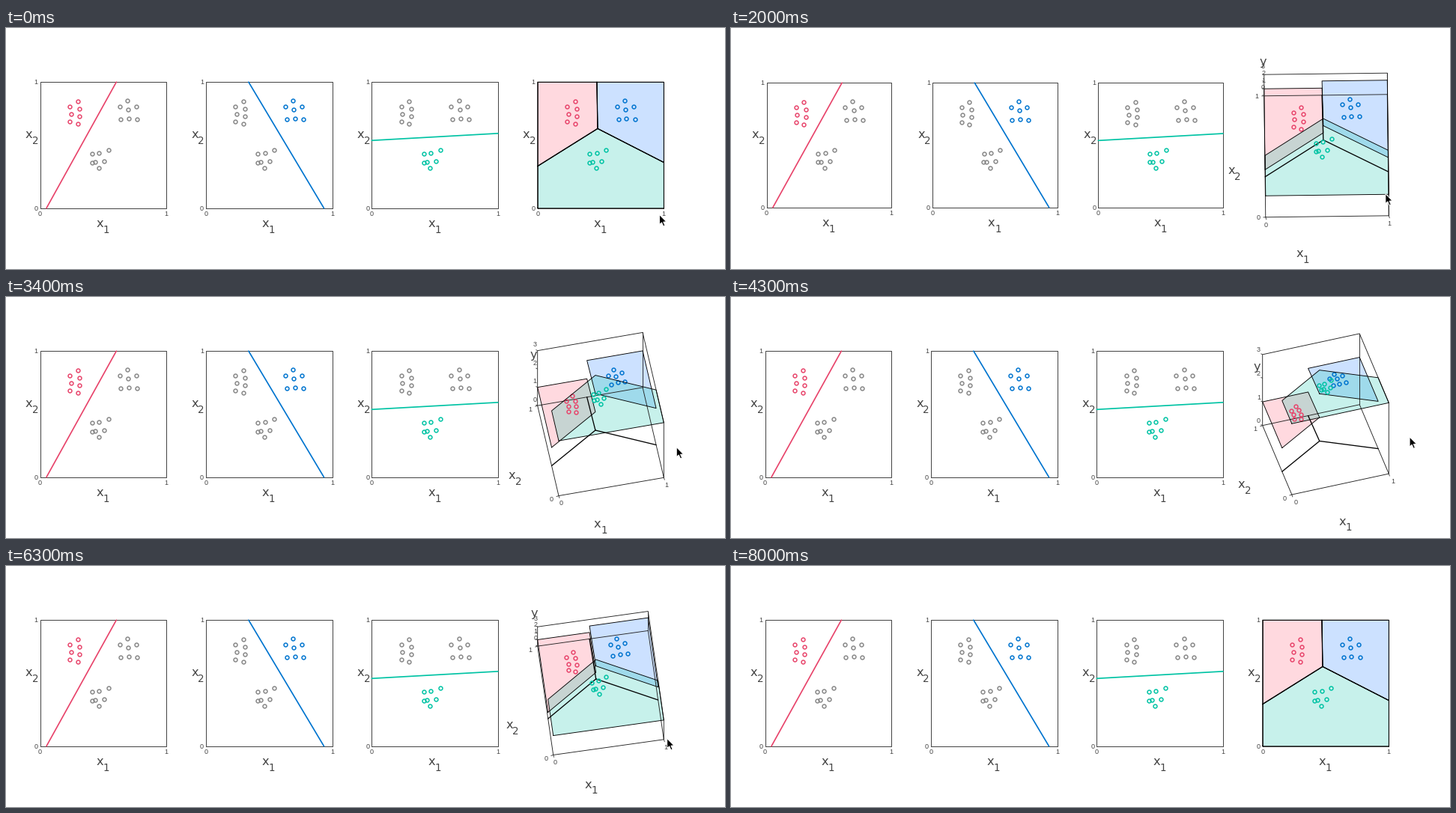
A matplotlib script that plays this animation: 960 px wide and 322 px high, repeating every 8.1 s.

```python
import numpy as np
import matplotlib.pyplot as plt
from matplotlib.animation import FuncAnimation

W, H, DPI = 960, 322, 100
FRAMES, STEP = 81, 100
PX = 72 / DPI
FULL, MID_Y = 168.6, 156
RIGHTS = [213.6 + 221.4 * k for k in range(4)]
GREY, FRAME = "#888888", "#444444"
INK = ["#e8446b", "#0074cf", "#00c3a4"]
FILL = [(1, .255, .39, .2), (0, .41, 1, .2), (0, .765, .65, .22)]

# Class boundaries: one line per flat panel, three regions meeting at HUB
SPLITS = [((.05, 0), (.604, 1)), ((.338, 1), (.935, 0)), ((0, .537), (1, .593))]
HUB, LEFT, EAST, NORTH = (.476, .631), (0, .333), (1, .363), (.47, 1)
REGIONS = [
    [LEFT, HUB, NORTH, (0, 1)],
    [HUB, EAST, (1, 1), NORTH],
    [(0, 0), (1, 0), EAST, HUB, LEFT],
]
BOX = [
    [(0, 0, 0), (1, 0, 0), (1, 1, 0), (0, 1, 0), (0, 0, 0)],
    [(0, 1, 0), (0, 1, 3), (1, 1, 3), (1, 0, 3), (1, 0, 0)],
    [(1, 1, 0), (1, 1, 3)],
]

# Poses of the dragged view: time, azimuth, elevation
POSES = [(1700, 0, 90), (2000, .7, 80), (2600, 5.2, 74.7), (4100, 16.8, 45.5),
         (5200, 16.8, 45.5), (5600, 16.3, 55.4), (6300, 8.1, 80), (7300, 0, 90)]
POINTER_END = 7300
ARROW = np.array([(0, 0), (0, 13), (3, 10.3), (5.2, 15.3), (7.3, 14.4), (5.2, 9.6), (9.2, 9.4)])

fig = plt.figure(figsize=(W / DPI, H / DPI), dpi=DPI, facecolor="white")
ax = fig.add_axes([0, 0, 1, 1])


def make_clusters():
    """A zigzag, three staggered columns and two rows over a single point."""
    zigzag = [(38 + 6 * (-1) ** i + 3 * np.sin(np.pi * i / 6) + 6, 26 - 5 * i - 2 * (i % 2))
              for i in range(7)]
    columns = [(117.5 + 11 * c - .1 * y, y) for c in (-1, 0, 1)
               for y in np.linspace(12 - 8 * abs(c), -12 - abs(c), 3 - abs(c))]
    u = np.array([0, .5, 1])
    rows = [*zip(69.4 + 22 * u ** 1.2, 72.3 + 5.5 * u ** 2),
            *zip(69.2 + 16 * u ** 2, 61.2 + 1.4 * u), (78, 53.4)]
    bases = (0, 116.4), (0, 131.4), (0, 0)
    return [(np.array(pts) + base) / FULL for pts, base in zip((zigzag, columns, rows), bases)]


CLUSTERS = make_clusters()


def ramp(t, start, end):
    return np.clip((t - start) / (end - start), 0, 1)


def view(t):
    times, azim, elev = zip(*POSES)
    return np.interp(t, times, azim), np.interp(t, times, elev)


def plot_size(t):
    """The plots shrink a little while the axis names find their place."""
    return FULL - sum(4 * np.sin(np.pi * ramp(t, start, end))
                      for start, end in ((1750, 3200), (6400, 7400)))


def pointer(t):
    """The view follows the pointer, which lets go once and grabs again."""
    azim, elev = view(t)
    regrab = ramp(t, 4300, 5200)
    approach = 18 * (1 - ramp(t, 900, 1700))
    return 872 + 2 * azim - 6 * regrab, 141 + elev + 9 * regrab + approach


def line(pts, color, width):
    pts = np.asarray(pts)
    ax.plot(pts[:, 0], pts[:, 1], color=color, lw=width * PX, solid_capstyle="round")


def rings(pts, color):
    ax.plot(pts[:, 0], pts[:, 1], "o", ms=4.9 * PX, mfc="none", mec=color, mew=1.5 * PX)


def text(x, y, s, size, rise, font="DejaVu Sans"):
    ax.text(x, y + rise * size, s, fontsize=size * PX, family=font, color=FRAME,
            ha="center", va="baseline")


def tick(x, y, s):
    text(x, y, s, 9, .36, "Liberation Sans")


def axis_name(x, y, index):
    text(x, y, "x", 16.2, .25)
    text(x + 8.6, y + 7, index, 13.5, .36)


def flat_panel(k, size):
    x0, y0 = RIGHTS[k] - size, MID_Y + size / 2

    def place(pts):
        return np.array([x0, y0]) + np.asarray(pts) * [size, -size]

    line(place([(0, 0), (1, 0), (1, 1), (0, 1), (0, 0)]), FRAME, 1)
    for j, cluster in enumerate(CLUSTERS):
        rings(place(cluster), INK[k] if j == k else GREY)
    line(place(SPLITS[k]), INK[k], 1.7)
    for v in (0, 1):
        tick(x0 + v * size, y0 + 6.5, str(v))
        tick(x0 - 5.5, y0 - v * size - .5, str(v))
    axis_name(x0 + size / 2 - 4.5, y0 + 21.5, "1")
    axis_name(x0 - 15, MID_Y - 13.5, "2")


def projector(azim, elev, size):
    """Orthographic view of a cube, fitted to the plot width and centred."""
    a, e = np.radians([azim, elev])
    s = size / (np.cos(a) + np.sin(a))
    axes = s * np.array([
        (np.cos(a), -np.sin(a) * np.sin(e)),
        (-np.sin(a), -np.cos(a) * np.sin(e)),
        (0, -np.cos(e) / 3)])
    centre = np.array([RIGHTS[3] - size / 2, MID_Y])

    def project(pts):
        return centre + (np.asarray(pts, float) - [.5, .5, 1.5]) @ axes

    return project


def lift(pts, z):
    return [(x, y, z) for x, y in pts]


def solid_panel(azim, elev, size):
    project = projector(azim, elev, size)
    depth = ramp(elev, 90, 82)
    tilt = ramp(azim, 0, 5)

    for path in BOX:
        line(project(path), "#222222", .9)
    for end in (LEFT, EAST, NORTH):
        line(project(lift([HUB, end], 0)), "black", 1.3)
    for k, region in enumerate(REGIONS):
        face = project(lift(region, k + 1))
        ax.fill(face[:, 0], face[:, 1], color=FILL[k], lw=0)
        line(np.vstack([face, face[:1]]), "black", .9)
        rings(project(lift(CLUSTERS[k], k + 1)), INK[k])

    for v in (0, 1):
        x, y = project((v, 0, 0))
        tick(x + .3 * azim, y + 6.5 + 3 * depth, str(v))
        line([(x, y), (x + depth, y + 3 * depth)], FRAME, .9)
        x, y = project((0, v, 0))
        tick(x - 5.5 - 4.5 * depth, y - .5 + 5 * tilt, str(v))
        line([(x, y), (x - 3 * depth, y + depth * tilt)], FRAME, .9)

    x, y = project((.5, 0, 0))
    axis_name(x - 4.5 + depth * (.14 * azim ** 2 - 32), y + 21.5 + 29 * depth, "1")
    x, y = project((0, .5, 0))
    axis_name(x - 15 - depth * (29 + 4 * tilt), y - 13.5 + depth * (30 + 17 * tilt), "2")

    if depth > .6:
        for v in range(4):
            x, y = project((0, 1, v))
            tick(x - 1 - .25 * azim, y - 6.7 - .14 * (elev - 45), str(v))
            line([(x, y), (x - 2, y - 1)], FRAME, .9)
        x, y = project((0, 1, 1.5))
        text(x - 1 - .4 * azim, y - 29, "y", 16.2, .17)


def draw(i):
    t = i * STEP
    ax.clear()
    ax.set(xlim=(-.5, W - .5), ylim=(H - .5, -.5))
    ax.axis("off")
    size = plot_size(t)
    for k in range(3):
        flat_panel(k, size)
    solid_panel(*view(t), size)
    if t <= POINTER_END:
        tip = ARROW + pointer(t)
        ax.fill(tip[:, 0], tip[:, 1], fc="black", ec="white", lw=.9 * PX, zorder=5)
    return []


anim = FuncAnimation(fig, draw, frames=FRAMES, init_func=lambda: [], interval=STEP,
                     repeat=True, repeat_delay=0)
plt.show()
```
